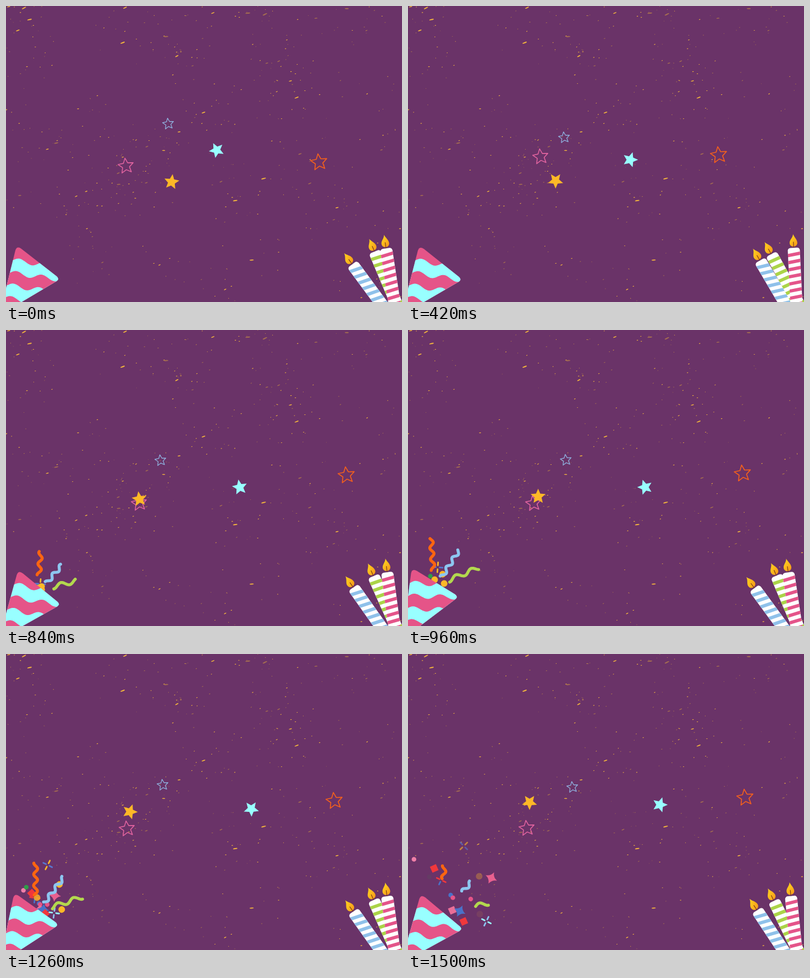
Write an HTML page with a canvas that moves like this. It is 720 px wide and 540 px high and loops after 1530 ms.

```html
<!DOCTYPE html>
<html lang="en">
<head>
<meta charset="utf-8">
<title>Party</title>
<style>
  html, body { margin: 0; width: 100%; height: 100%; overflow: hidden; background: #6a3368; }
  canvas { display: block; }
</style>
</head>
<body>
<canvas width="720" height="540"></canvas>
<script>
const ctx = document.querySelector('canvas').getContext('2d');
const LOOP = 1530, STEP = 30, TAU = Math.PI * 2;
const BG = '#6a3368', PINK = '#e55488', CYAN = '#98ffff', GOLD = '#fdb827',
      ORANGE = '#ff6510', BLUE = '#8dc6f0', LIME = '#b3d84e', RED = '#f0383c', ROYAL = '#4a72c8';
const rad = deg => deg * Math.PI / 180;
const clamp = v => Math.max(0, Math.min(1, v));

function at(x, y, deg, draw) {
  ctx.save();
  ctx.translate(x, y);
  ctx.rotate(rad(deg));
  draw();
  ctx.restore();
}

// Background flecks, loosely clustered
let seed = 11;
const random = () => (seed = (seed * 16807) % 2147483647) / 2147483647;
const faint = new Path2D(), bright = new Path2D();
function fleck(x, y, size) {
  const path = random() < 0.5 ? bright : faint, tilt = -0.5 * random();
  path.moveTo(x + size * Math.cos(tilt), y + size * Math.sin(tilt));
  path.ellipse(x, y, size, 0.4 + size * 0.15, tilt, 0, TAU);
}
for (let i = 0; i < 55; i++) {
  const x = random() * 720, y = random() ** 1.3 * 540;
  fleck(x, y, 1.5 + random() * 3);
  for (let j = 0; j < 9; j++)
    fleck(x + (random() - 0.5) * 110, y + (random() - 0.5) * 80, 0.4 + random());
}

// Drifting stars: two spin along arcs, three wander through a few points
const KEYS = [0, 420, 600, 840, 1080, 1260, 1500];
function wander(points, t) {
  const last = KEYS.length - 1;
  let i = 0;
  while (i < last - 1 && t > KEYS[i + 1]) i++;
  const span = KEYS[i + 1] - KEYS[i], u = (t - KEYS[i]) / span;
  return [0, 1].map(axis => {
    const slope = k => {
      const a = Math.max(0, k - 1), b = Math.min(last, k + 1);
      return (points[b][axis] - points[a][axis]) / (KEYS[b] - KEYS[a]) * span;
    };
    const p = points[i][axis], d = points[i + 1][axis] - p, m = slope(i), n = slope(i + 1);
    return p + u * (m + u * (3 * d - 2 * m - n + u * (m + n - 2 * d)));
  });
}
const STARS = [
  { r: 10.5, line: '#8fb0dd',
    path: [[295, 215], [284, 240], [287, 239], [281, 238], [293, 237], [285, 239], [299, 243]] },
  { r: 14.5, line: '#e0639f',
    path: [[218, 292], [241, 275], [239, 297], [242, 316], [214, 315], [220, 319], [216, 318]] },
  { r: 15.5, line: '#f4601c',
    path: [[569, 285], [565, 272], [588, 269], [619, 265], [594, 260], [597, 268], [613, 262]] }
];
function drawStar(x, y, r, deg, fill, line) {
  at(x, y, deg, () => {
    ctx.beginPath();
    for (let i = 0; i < 10; i++) {
      const radius = i % 2 ? r * 0.46 : r, a = i * TAU / 10;
      ctx.lineTo(radius * Math.sin(a), -radius * Math.cos(a));
    }
    ctx.closePath();
    if (fill) {
      ctx.fillStyle = fill;
      ctx.fill();
    } else {
      ctx.strokeStyle = line;
      ctx.lineWidth = 0.6 + r * 0.07;
      ctx.lineJoin = 'round';
      ctx.stroke();
    }
  });
}
function drawStars(t) {
  const p = t / 1500;
  STARS.forEach(s => drawStar(...wander(s.path, t), s.r, -7, null, s.line));
  drawStar(221 + 80 * Math.max(0, 1 - p) ** 1.6, 321 - 50.5 * p ** 2.4, 14.3, 8 + t / 15, GOLD);
  drawStar(383 + t / 20, 287 - 24 * (t / 880 - 1) ** 2, 14.3, 46 - t / 15, CYAN);
}

// Candles: base point, height to the flame, resting angle, swing
const CANDLES = [
  { x: 700, y: 567, h: 132, a: -36.3, swing: 6, color: '#8fc1ea' },
  { x: 710, y: 543, h: 116, a: -22.8, swing: -6, color: '#abd448' },
  { x: 706, y: 540, h: 112, a: -8.7, swing: 6, color: '#e4548a' }
];
function drawCandle(c, t) {
  const sway = (1 - Math.cos(rad(0.45 * t - 0.0001 * t * t))) / 2;
  at(c.x, c.y, c.a + c.swing * sway, () => {
    const top = 13 - c.h, rise = 11 * Math.tan(rad(-18 - c.a));
    ctx.save();
    ctx.beginPath();
    ctx.roundRect(-11, top, 22, 220, 5);
    ctx.fillStyle = '#fff';
    ctx.fill();
    ctx.clip();
    ctx.strokeStyle = c.color;
    ctx.lineWidth = 6;
    for (let y = top + 12; y < 60; y += 13) {
      ctx.beginPath();
      ctx.moveTo(-12, y - rise);
      ctx.lineTo(12, y + rise);
      ctx.stroke();
    }
    ctx.restore();

    ctx.translate(0, -c.h);
    const glow = ctx.createLinearGradient(-6, -6, 7, 8);
    glow.addColorStop(0, '#ffd21f');
    glow.addColorStop(1, '#f79a1a');
    ctx.fillStyle = glow;
    ctx.beginPath();
    ctx.moveTo(0, -12);
    ctx.bezierCurveTo(2, -6, 7, -2, 7, 4);
    ctx.bezierCurveTo(7, 13, -7, 13, -7, 4);
    ctx.bezierCurveTo(-7, -2, -1, -5, 0, -12);
    ctx.fill();
    ctx.strokeStyle = '#7a3a1c';
    ctx.lineWidth = 1.2;
    ctx.beginPath();
    ctx.moveTo(0, 2);
    ctx.lineTo(0, 13);
    ctx.stroke();
  });
}

// Party popper, drawn in its resting pose and rocked about its tip
const PIVOT = { x: -9, y: 547 }, MOUTH = { x: 57, y: 472 };
const cone = new Path2D('M-12 564L17 446Q20 437 28 443L92 493Q98 498 92 502Z');
function drawCone() {
  ctx.save();
  ctx.clip(cone);
  ctx.fillStyle = PINK;
  ctx.fillRect(-60, 420, 200, 200);
  for (let k = 0; k < 6; k++) {
    ctx.beginPath();
    for (let x = -40; x <= 110; x += 2)
      ctx.lineTo(x, 462 + 23.5 * k + 0.14 * x - 4.5 * Math.cos((x - 24 + 5 * k) * TAU / 46));
    ctx.lineTo(110, 640);
    ctx.lineTo(-40, 640);
    ctx.fillStyle = k % 2 ? PINK : CYAN;
    ctx.fill();
  }
  ctx.restore();
}

// Streamers grow out of the mouth, then vanish from the same end
const STREAMERS = [
  { x: 54, y: 445, dx: 3, dy: -61, waves: 3, bend: 3.5, color: ORANGE },
  { x: 69, y: 457, dx: 38, dy: -47, waves: 3, bend: 3.5, color: BLUE },
  { x: 85, y: 470, dx: 58, dy: -17, waves: 2, bend: -4, color: LIME }
];
function drawStreamer(s, t) {
  const from = clamp((t - 1240) / 420), to = clamp((t - 504) / 480);
  if (!to) return;
  const len = Math.hypot(s.dx, s.dy);
  ctx.beginPath();
  for (let i = 0; i <= 50; i++) {
    const p = from + (to - from) * i / 50, side = s.bend * (1 - Math.cos(p * s.waves * TAU)) / len;
    ctx.lineTo(s.x + s.dx * p - s.dy * side, s.y + s.dy * p + s.dx * side);
  }
  ctx.strokeStyle = s.color;
  ctx.lineWidth = 5.4;
  ctx.lineCap = ctx.lineJoin = 'round';
  ctx.stroke();
}

const SHAPES = {
  ball() {
    ctx.arc(0, 0, 6, 0, TAU);
    ctx.fill();
  },
  dot() {
    ctx.arc(0, 0, 4.2, 0, TAU);
    ctx.fill();
  },
  square() {
    ctx.rotate(rad(40));
    ctx.fillRect(-6, -6, 12, 12);
  },
  spark() {
    for (let i = 0; i <= 4; i++) {
      const a = i * TAU / 4, m = a - TAU / 8;
      ctx.quadraticCurveTo(3.5 * Math.sin(m), -3.5 * Math.cos(m), 11.5 * Math.sin(a), -11.5 * Math.cos(a));
    }
    ctx.fill();
  },
  cross(color, second) {
    ctx.lineWidth = 2.8;
    ctx.lineCap = 'round';
    for (let i = 0; i < 4; i++) {
      ctx.strokeStyle = i % 2 ? second : color;
      ctx.beginPath();
      ctx.moveTo(0, -3.5);
      ctx.lineTo(0, -9);
      ctx.stroke();
      ctx.rotate(TAU / 4);
    }
  }
};
// Pieces fan out from left to right; the early ones fade away
const piece = (shape, dist, color, second) => ({ shape, dist, color, second });
const early = (...args) => ({ ...piece(...args), early: true });
const CONFETTI = [
  piece('dot', 111, '#f07fa8'),
  early('dot', 71, '#2f9e48'),
  piece('square', 84, RED),
  piece('cross', 62, ROYAL, RED),
  early('ball', 38, GOLD),
  early('cross', 131, GOLD, '#5878d0'),
  piece('dot', 39, ROYAL),
  piece('dot', 37, PINK),
  early('ball', 98, GOLD),
  piece('spark', 113, '#e8608f'),
  piece('dot', 61, PINK),
  piece('square', 22, '#ea6e98'),
  piece('spark', 35, ROYAL),
  early('ball', 71, GOLD),
  piece('cross', 84, BLUE, CYAN),
  piece('square', 44, RED)
];
function drawPiece(c, i, t) {
  const birth = c.early ? 780 : 1100;
  if (t < birth) return;
  const angle = rad(-28 + i * 134 / (CONFETTI.length - 1)), r = c.dist * (t - birth) / (1500 - birth);
  at(MOUTH.x + r * Math.sin(angle), MOUTH.y - r * Math.cos(angle), (t - birth) * 0.06, () => {
    if (c.early) ctx.globalAlpha = clamp((1380 + 2 * c.dist - t) / 240);
    ctx.fillStyle = c.color;
    ctx.beginPath();
    SHAPES[c.shape](c.color, c.second);
  });
}

function drawPopper(t) {
  const rock = t < 410 ? 0 : 10.5 * Math.sin(Math.PI * t / 1600) * Math.sin((t - 410) * TAU / 900);
  at(PIVOT.x, PIVOT.y, rock, () => {
    ctx.translate(-PIVOT.x, -PIVOT.y);
    CONFETTI.forEach((c, i) => drawPiece(c, i, t));
    STREAMERS.forEach(s => drawStreamer(s, t));
    drawCone();
  });
}

function frame(now) {
  const t = Math.floor(now % LOOP / STEP) * STEP;
  ctx.fillStyle = BG;
  ctx.fillRect(0, 0, 720, 540);
  ctx.fillStyle = '#a56d50';
  ctx.fill(faint);
  ctx.fillStyle = '#f3b53c';
  ctx.fill(bright);
  drawStars(t);
  drawPopper(t);
  CANDLES.forEach(c => drawCandle(c, t));
  requestAnimationFrame(frame);
}
frame(0);
</script>
</body>
</html>
```
